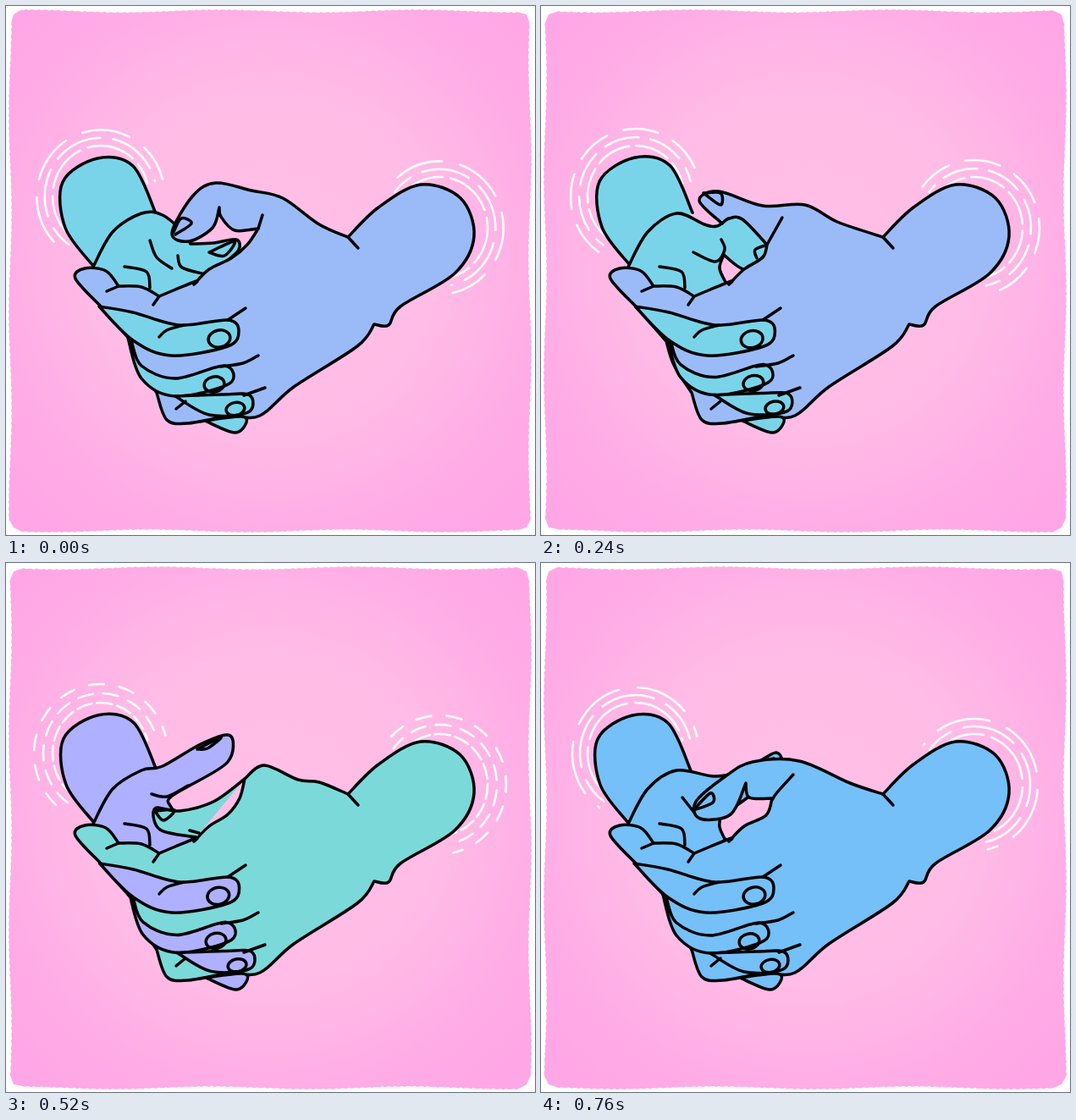
These frames come from a looping animation (625 px wide and 625 px high, 0.8 s). An HTML page with a canvas:

```html
<!DOCTYPE html>
<html>
<head>
<meta charset="utf-8">
<style>
html, body { margin: 0; height: 100%; overflow: hidden; background: #fff; }
canvas { display: block; width: 100vw; height: 100vh; }
</style>
</head>
<body>
<canvas width="625" height="625"></canvas>
<script>
const ctx = document.querySelector('canvas').getContext('2d');
ctx.lineJoin = ctx.lineCap = 'round';

// The skin colours run to and fro; the hands are half a loop apart.
const hues = ['#7ad4e9', '#7cd9d9', '#7ad4e9', '#75c0f8', '#9bbbf8', '#afb0ff', '#9bbbf8', '#75c0f8'];
let left, right;

// Smooth curve through points; "/" marks a corner.
function trace(str) {
  const path = new Path2D();
  let last;
  for (const part of str.split('/')) {
    const n = part.match(/\d+/g).map(Number);
    const p = last ? [last] : [];
    for (let i = 0; i < n.length; i += 2) p.push([n[i], n[i + 1]]);
    if (!last) path.moveTo(...p[0]);
    for (let i = 0; i < p.length - 1; i++) {
      const a = p[i - 1] || p[i], b = p[i], c = p[i + 1], d = p[i + 2] || c;
      path.bezierCurveTo(b[0] + (c[0] - a[0]) / 6, b[1] + (c[1] - a[1]) / 6,
        c[0] - (d[0] - b[0]) / 6, c[1] - (d[1] - b[1]) / 6, ...c);
    }
    last = p[p.length - 1];
  }
  return path;
}

function shape(str, color) {
  const path = trace(str);
  ctx.fillStyle = color;
  ctx.fill(path);
  ctx.stroke(path);
}

function lines(str) {
  str.split(';').forEach(s => ctx.stroke(trace(s)));
}

function shifted(x, y, draw) {
  ctx.save();
  ctx.translate(x, y);
  draw();
  ctx.restore();
}

function nail(x, y, rx, ry) {
  ctx.beginPath();
  ctx.ellipse(x, y, rx, ry, -.2, 0, 7);
  ctx.stroke();
}

// Left palm, ending in the given thumb.
function back(thumb) {
  shape('103 308 126 267 160 245 ' + thumb + '/224 328/200 345/120 345', left);
  lines('140 308 166 314 170 333');
}

// Right arm and hand, with the given upper edge from wrist to web.
function front(edge) {
  shape('404 273 ' + edge + ' 240 311 222 329' +
    '/225 325 200 335 181 343/160 332 133 331/118 313 93 310 82 322 112 355/148 396/157 424 178 457' +
    '/190 489 215 493 262 485 300 484 340 450 415 402 435 376' +
    '/452 377 466 355 530 316 553 272 537 227 490 211 440 238 404 273', right);
}

function pose0() {
  back('185 247 210 268 218 281/245 280 272 276 275 288 260 302');
  lines('170 277 178 297 196 310;203 295 208 309 236 317;240 291 270 278 258 295 240 291');
  front('370 258 327 227 290 218 248 209 221 224 196 268 216 278 244 262 252 238/254 249 270 265 298 263/285 282 266 298');
  lines('303 247 298 263;198 267 207 251 219 257 200 270');
}

function pose1() {
  back('185 245 215 263 238 264 243 288 258 298');
  lines('183 278 184 300 204 304;216 282 210 298 222 321;237 301 257 297 245 308 237 301');
  front('360 256 312 231 266 220 216 192 190 184 189 212 237 246/245 256 281 272/262 297');
  lines('237 246 245 240;289 250 281 272;193 185 216 197 203 205 193 185');
}

function pose2() {
  back('193 258 208 260 222 251 238 252 267 282 262 297/240 311 216 294/211 310 219 328');
  lines('180 291 206 302 217 288 213 276;255 298 253 288 268 282');
  front('350 255 312 235 262 236 210 219 187 230 214 257/222 251 238 252 267 282/262 297');
  lines('285 250 267 282;192 221 212 221 212 235 192 221');
}

function pose3() {
  back('197 245 212 238 228 241 262 233 271 252 260 295 221 291/208 308 218 328');
  lines('180 272 203 288 218 278;198 289 220 290;236 245 261 236 245 249 236 245');
  front('345 258 300 241 272 248/262 297');
}

function pose4() {
  back('185 243 218 233 255 217 271 232 250 268 218 279/215 318 222 328');
  lines('178 272 207 283 218 278;231 230 260 219 242 232 231 230');
  front('355 258 300 240 274 253/262 297');
  shape('274 253 250 282 210 286 192 298 214 322 226 321', right);
  lines('194 290 213 290 202 300 194 290');
}

function pose5() {
  back('185 240 232 213 265 204 262 235 215 264/193 278 196 290 222 328');
  lines('172 273 190 276 215 263;226 220 254 206 238 219 226 220');
  front('370 259 345 256 305 239 282 255/276 278 262 297');
  shape('282 255 245 282 205 293 176 290 182 315 225 324', right);
  lines('217 316 228 319;176 293 199 292 186 304 176 293');
}

function pose6() {
  back('185 245 225 231 275 208 272 236 205 264/206 312 217 326');
  lines('168 275 192 280;245 222 267 210 253 223 245 222');
  front('368 259 303 236 258 254 212 276 174 286 178 309 246 294/262 297');
  lines('291 250 262 293;171 293 192 284 188 298 171 293');
}

function pose7() {
  back('205 252 240 245 278 224 278 250 212 300/211 312 217 326');
  lines('167 277 182 296;258 235 275 231');
  front('365 260 305 234 250 235 218 252 183 282 188 302 224 297 242 260/246 277 273 278/266 298');
  lines('298 250 279 271 273 280;180 292 200 272 203 283 180 292');
}

const poses = [pose0, pose1, pose2, pose3, pose4, pose5, pose6, pose7];

// Left fingers, swaying by s.
function fingers(s) {
  shifted(4 * s, 0, () => shape('235 490 270 504 284 492 277 485 235 490', left));
  shifted(7 * s, -2 * s, () => {
    shape('148 396/160 425 200 440 258 425 264 446 200 461 160 440 144 392', left);
    nail(246, 447, 12, 9);
    shape('200 461 255 459 288 460 286 480 240 483 200 461', left);
    nail(271, 476, 11, 7.5);
  });
  shifted(2 * s, 0, () => shape('110 355 150 362 205 377 262 371 275 384 262 402 195 413 150 395 110 355', left));
  lines('181 391 190 383 210 377');
  nail(252 - 4 * s, 393 + s, 13, 10);
}

// Three rings of dashes that break up and spread as k grows.
function shake(x, y, from, to, k) {
  const rad = Math.PI / 180;
  for (let ring = 0; ring < 3; ring++) {
    const r = 57 + ring * (9 + 2 * k);
    ctx.setLineDash([64 - 46 * k, 10 + ring * 6 - 4 * k]);
    ctx.lineDashOffset = ring * 31;
    ctx.beginPath();
    ctx.ellipse(x, y, r, r + 3, 0, from * rad, to * rad);
    ctx.stroke();
  }
  ctx.setLineDash([]);
}

const glow = ctx.createRadialGradient(312, 300, 0, 312, 300, 400);
glow.addColorStop(0, '#ffbfe6');
glow.addColorStop(.5, '#ffbce6');
glow.addColorStop(.8, '#ffade6');
glow.addColorStop(1, '#ffa7e6');

// Pink card with uneven edges.
function card(i) {
  ctx.fillStyle = '#fff';
  ctx.fillRect(0, 0, 625, 625);
  ctx.beginPath();
  for (let side = 0; side < 4; side++) {
    const c = [1, 0, -1, 0][side], s = [0, 1, 0, -1][side];
    const add = (x, y) => ctx.lineTo(312 + x * c - y * s, 313 + x * s + y * c);
    for (let d = -294; d <= 294; d += 3) {
      add(d, -307 + 1.6 * Math.sin(d / 37 + side * 2 + i % 3) + .6 * Math.sin(d * 5 + i % 3));
    }
    add(303, -303);
  }
  ctx.fillStyle = glow;
  ctx.fill();
}

function render(i) {
  left = hues[i];
  right = hues[(i + 4) % 8];
  const s = [0, .35, .7, 1, .7, .3, .1, 0][i];
  const k = i === 7 ? 0 : i === 6 ? .5 : .15 + i * .17;

  card(i);
  ctx.strokeStyle = '#fff';
  ctx.lineWidth = 2.6;
  shake(112, 225, 125, 345, k);
  shake(512, 262, 217, 438, k);

  ctx.strokeStyle = '#000';
  ctx.lineWidth = 3.5;
  shifted(3 * s, -s, () => shape('177 245 150 189 108 180 67 208 70 262 103 307', left));
  poses[i]();
  fingers(s);
  lines('404 273 416 286;133 331 119 337;181 343 174 353;262 371 283 357;' +
    '254 426 280 422 298 413;281 460 306 451;201 476 212 467');
}

// Poses last 120 ms, but the fourth and the eighth only 40 ms.
const poseAt = t => Math.floor(t / 400) * 4 + Math.floor(t % 400 / 120);

let shown = -1;
function tick() {
  const i = poseAt(performance.now() % 800);
  if (i !== shown) render(shown = i);
  requestAnimationFrame(tick);
}
tick();
</script>
</body>
</html>
```
